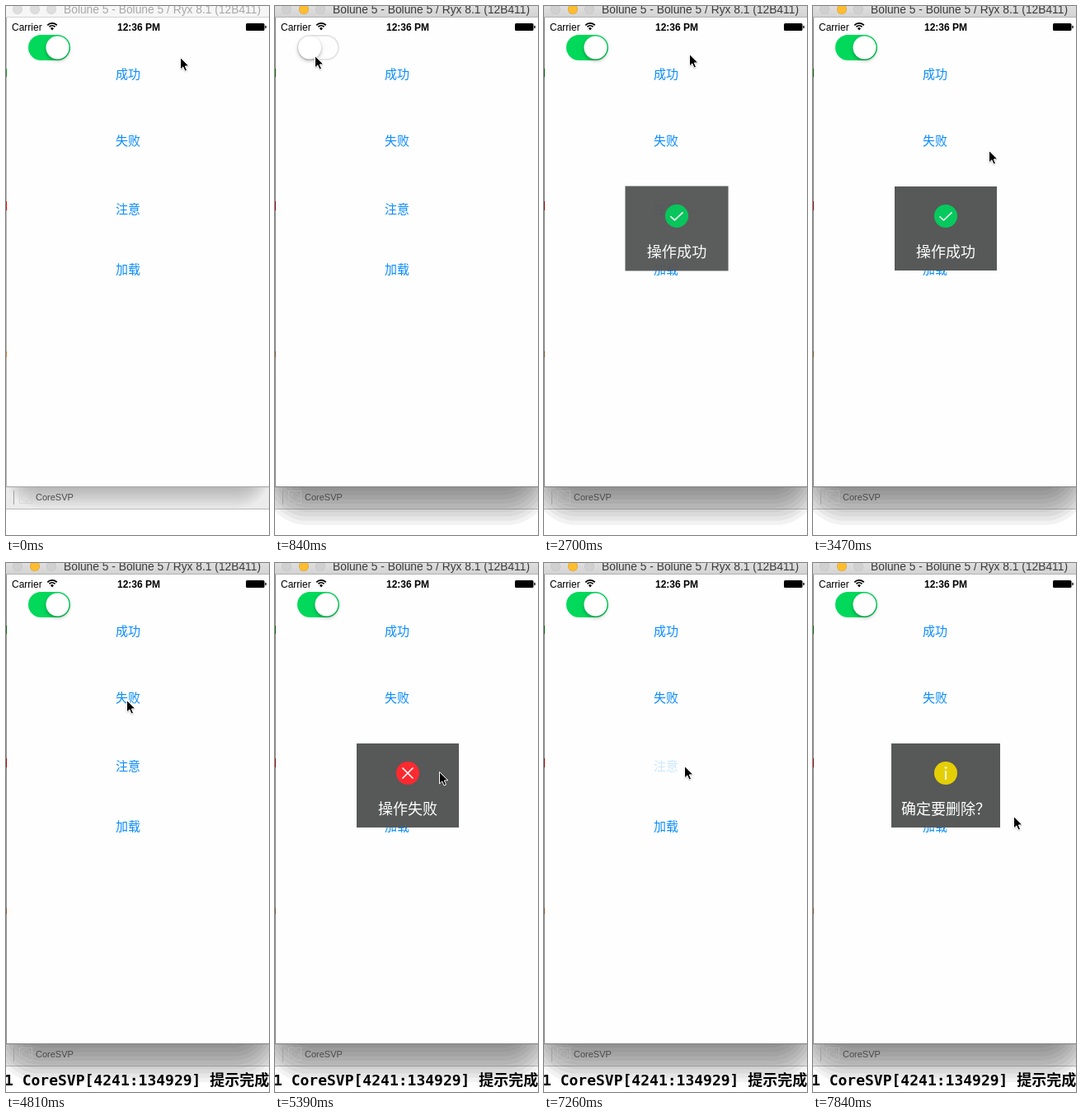
Recreate the animation shown at these times as an HTML page with a canvas. Size 319 px wide and 642 px high, loop 8 s.

```html
<!DOCTYPE html>
<html lang="zh">
<head>
<meta charset="utf-8">
<style>
html, body { margin: 0; width: 100%; height: 100%; overflow: hidden; background: #fff; }
canvas { display: block; width: 319px; height: 642px; }
</style>
</head>
<body>
<canvas id="stage" width="319" height="642"></canvas>
<script>
const ctx = document.getElementById('stage').getContext('2d');
const LOOP = 8000, W = 319, H = 642;
const SANS = '"Liberation Sans", Arial, sans-serif';
const CJK = '"Noto Sans CJK SC", "Noto Sans CJK", sans-serif';
const MONO = '"DejaVu Sans Mono", "Noto Sans CJK SC", monospace';
const ACTIVATE = 500, LOG_AT = 4230;

const clamp = v => Math.max(0, Math.min(1, v));
const ramp = (t, a, b) => clamp((t - a) / (b - a));
const ease = p => p * p * (3 - 2 * p);
const easeOut = p => 1 - (1 - p) * (1 - p);
const mix = (a, b, p) => a + (b - a) * p;

function text(str, x, y, font, color, align = 'left') {
  ctx.font = font;
  ctx.fillStyle = color;
  ctx.textAlign = align;
  ctx.fillText(str, x, y);
}

function box(x, y, w, h, color) {
  ctx.fillStyle = color;
  ctx.fillRect(x, y, w, h);
}

function disc(x, y, r, color) {
  ctx.fillStyle = color;
  ctx.beginPath();
  ctx.arc(x, y, r, 0, Math.PI * 2);
  ctx.fill();
}

function pill(x, y, w, h, r, color) {
  ctx.fillStyle = color;
  ctx.beginPath();
  ctx.roundRect(x, y, w, h, r);
  ctx.fill();
}

function line(points, color, width) {
  ctx.strokeStyle = color;
  ctx.lineWidth = width;
  ctx.beginPath();
  points.forEach(([x, y]) => ctx.lineTo(x, y));
  ctx.stroke();
}

// Pointer path: time, x, y
const PATH = [
  [0, 211, 62], [50, 211, 62], [450, 50, 58], [780, 48, 60], [1080, 48, 60],
  [1480, 161, 82], [1640, 152, 81], [2590, 152, 81], [2830, 205, 30],
  [3080, 240, 110], [3350, 226, 206], [3470, 213, 175], [4500, 213, 175],
  [4790, 146, 166], [5100, 146, 166], [5250, 178, 308], [5390, 199, 253],
  [5600, 199, 253], [5630, 199, 254], [6260, 199, 254], [6680, 175, 245],
  [6860, 170, 246], [7480, 170, 246], [7780, 232, 302], [7840, 243, 307]
];

function pointerAt(t) {
  for (let i = 1; i < PATH.length; i++) {
    const [a, x0, y0] = PATH[i - 1], [b, x1, y1] = PATH[i];
    if (t < b) {
      const p = ease(ramp(t, a, b));
      return [Math.round(mix(x0, x1, p)), Math.round(mix(y0, y1, p))];
    }
  }
  return PATH[PATH.length - 1].slice(1);
}

function drawPointer(t) {
  const [x, y] = pointerAt(t);
  ctx.save();
  ctx.translate(x + 0.5, y + 0.5);
  ctx.beginPath();
  [[0, 0], [0, 14.5], [3.3, 11.4], [5.6, 16.6], [8, 15.6], [5.8, 10.5], [10.3, 10.3]]
    .forEach(([px, py]) => ctx.lineTo(px, py));
  ctx.closePath();
  ctx.shadowColor = 'rgba(0,0,0,.35)';
  ctx.shadowBlur = 2;
  ctx.shadowOffsetY = 1;
  ctx.fillStyle = '#000';
  ctx.fill();
  ctx.shadowColor = 'transparent';
  ctx.strokeStyle = '#fff';
  ctx.lineWidth = 1;
  ctx.stroke();
  ctx.restore();
}

function drawBackdrop(t, active) {
  box(0, 0, W, H, '#fff');
  box(0, 583, W, 27, '#ebebeb');
  box(0, 610, W, 1, '#b8b8b8');
  drawShadow(active);
  box(9, 588, 1, 17, '#a0a0a0');
  ctx.setLineDash([1, 1]);
  ctx.strokeStyle = '#c4c4c4';
  ctx.lineWidth = 1;
  ctx.strokeRect(16.5, 588.5, 15, 15);
  ctx.beginPath();
  ctx.arc(24, 596, 5, 0, Math.PI * 2);
  ctx.stroke();
  ctx.setLineDash([]);
  text('CoreSVP', 36, 600, '11px ' + SANS, '#4a4a4a');
  if (t >= LOG_AT) {
    text('1 CoreSVP[4241:134929] 提示完成', -2, 634, 'bold 18px ' + MONO, '#000');
  }
}

// The window shadow falls off in visible bands.
function drawShadow(active) {
  const bands = 9, reach = active ? 47 : 26, alpha = active ? 0.05 : 0.028;
  ctx.save();
  ctx.beginPath();
  ctx.rect(0, 583, W, H - 583);
  ctx.clip();
  for (let i = 0; i < bands; i++) {
    const d = reach * (1 - i / bands), x = 14 - d * 0.6;
    pill(x, 400, 320 - 2 * x, 183 + d, 30 + d * 0.5, `rgba(0,0,0,${alpha})`);
  }
  ctx.restore();
}

function drawTitleBar(active) {
  const bar = ctx.createLinearGradient(0, 0, 0, 14);
  bar.addColorStop(0, active ? '#dfdfdf' : '#f6f6f6');
  bar.addColorStop(1, active ? '#d2d2d2' : '#f6f6f6');
  box(0, 0, W, 14, bar);
  box(0, 13, W, 1, active ? '#b2b2b2' : '#d4d4d4');
  [14, 35, 55].forEach((x, i) => {
    const lit = active && i === 1;
    disc(x, 4, 6, lit ? '#e0a02c' : active ? '#c4c4c4' : '#d2d2d2');
    disc(x, 4, 5.4, lit ? '#fdbd2f' : active ? '#d0d0d0' : '#dddddd');
  });
  text('Bolune 5 - Bolune 5 / Ryx 8.1 (12B411)', 70, 9, '13.8px ' + SANS, active ? '#3c3c3c' : '#a8a8a8');
}

function drawStatusBar() {
  text('Carrier', 7, 30, '12px ' + SANS, '#000');
  text('12:36 PM', 161, 30, 'bold 12px ' + SANS, '#000', 'center');
  ctx.strokeStyle = '#000';
  ctx.lineWidth = 1.8;
  [7.8, 4.8].forEach(r => {
    ctx.beginPath();
    ctx.arc(56, 28.6, r, -Math.PI * 0.76, -Math.PI * 0.24);
    ctx.stroke();
  });
  ctx.fillStyle = '#000';
  ctx.beginPath();
  ctx.moveTo(56, 29.4);
  ctx.arc(56, 28.6, 2.4, -Math.PI * 0.8, -Math.PI * 0.2);
  ctx.fill();
  pill(291, 21, 22.5, 9, 1.5, '#000');
  pill(314.3, 23.8, 1.4, 3.4, 0.7, '#000');
}

function drawSwitch(t) {
  const on = 1 - ease(ramp(t, 560, 800)) + ease(ramp(t, 880, 1120));
  const off = 1 - on;
  const rgb = [[229, 2], [229, 217], [229, 91]].map(([a, b]) => Math.round(mix(a, b, on)));
  pill(27, 35, 51, 31, 15.5, `rgb(${rgb})`);
  if (off > 0.01) {
    const w = 47 * off, h = 27 * off;
    pill(52.5 - w / 2, 50.5 - h / 2, w, h, h / 2, '#fefefe');
  }
  ctx.save();
  ctx.shadowColor = 'rgba(0,0,0,.3)';
  ctx.shadowBlur = 4;
  ctx.shadowOffsetY = 2;
  disc(mix(42, 62.5, on), 50.5, 14, '#fff');
  ctx.restore();
}

// Label, centre y, press time, release time
const BUTTONS = [
  ['成功', 83, 1735, 1760],
  ['失败', 164, 4870, 5100],
  ['注意', 247, 7200, 7340],
  ['加载', 320, Infinity, Infinity]
];

function drawButtons(t) {
  for (const [label, y, down, up] of BUTTONS) {
    ctx.globalAlpha = t < down ? 1 : t < up ? 0.2 : mix(0.2, 1, easeOut(ramp(t, up, up + 300)));
    text(label, 148, y + 5, '15px ' + CJK, '#0a8cff', 'center');
  }
  ctx.globalAlpha = 1;
}

const ICONS = {
  check() {
    disc(161, 255, 14, '#06c95d');
    line([[153.5, 255.5], [158.5, 260], [168.5, 250.5]], '#fff', 1.6);
  },
  cross() {
    disc(161, 255, 14, '#fb2a30');
    line([[154.5, 248.5], [167.5, 261.5]], '#fff', 1.6);
    line([[167.5, 248.5], [154.5, 261.5]], '#fff', 1.6);
  },
  info() {
    disc(161, 255, 14, '#e4cf06');
    disc(161, 248.5, 1.3, '#fff');
    line([[161, 252], [161, 263]], '#fff', 1.7);
  }
};

// Icon, message, width, show time, hide time
const HUDS = [
  ['check', '操作成功', 124, 2560, 4050],
  ['cross', '操作失败', 124, 5110, 7010],
  ['info', '确定要删除？', 132, 7360, Infinity]
];

function drawHuds(t) {
  for (const [icon, message, width, show, hide] of HUDS) {
    if (t < show || t >= hide + 170) continue;
    const enter = easeOut(ramp(t, show, show + 170));
    const leave = hide < Infinity ? ease(ramp(t, hide, hide + 170)) : 0;
    const scale = mix(1.3, 1, enter) * mix(1, 0.8, leave);
    ctx.save();
    ctx.globalAlpha = enter * (1 - leave);
    ctx.translate(161, 270);
    ctx.scale(scale, scale);
    ctx.translate(-161, -270);
    box(161 - width / 2, 219, width, 102, '#575858');
    ICONS[icon]();
    text(message, 161, 304.5, '300 18px ' + CJK, '#fff', 'center');
    ctx.restore();
  }
}

function drawWindow(t, active) {
  box(0, 14, W, 569, '#fefefe');
  box(0, 14, 1, 569, active ? '#8f8f8f' : '#b4b4b4');
  box(0, 583, W, 1, active ? '#808080' : '#a4a4a4');
  box(0, 76, 1, 10, active ? '#0a6a10' : '#0c9a1c');
  box(0, 237, 1, 11, active ? '#9c0c0c' : '#dd1010');
  box(0, 419, 1, 7, active ? '#8a5a28' : '#cf7a28');
  drawTitleBar(active);
  drawStatusBar();
  drawSwitch(t);
  drawButtons(t);
  drawHuds(t);
}

const start = performance.now();

function tick() {
  const t = (performance.now() - start) % LOOP, active = t >= ACTIVATE;
  drawBackdrop(t, active);
  drawWindow(t, active);
  drawPointer(t);
  requestAnimationFrame(tick);
}
tick();
</script>
</body>
</html>
```
